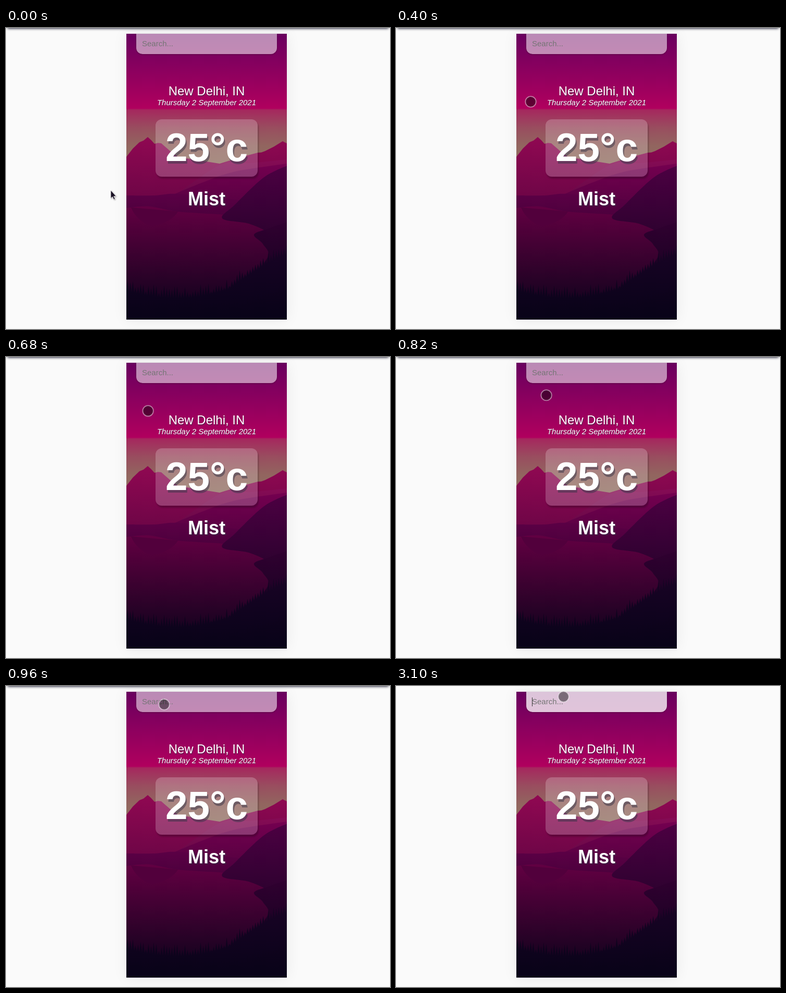
Write an HTML page that moves like this. It is 737 px wide and 577 px high and loops after 8000 ms.

```html
<!DOCTYPE html>
<html lang="en">
<head>
<meta charset="utf-8">
<title>Weather</title>
<style>
  html, body { margin: 0; width: 100%; height: 100%; overflow: hidden; background: #fafafa; }
  body { position: relative; font-family: "Liberation Sans", Arial, sans-serif; color: #fff; }
  body > * { position: absolute; }
  svg { left: 0; top: 0; }
  #strip { left: 4px; right: 4px; top: -6px; height: 6px; box-shadow: 0 0 5px 1px #1c1c30; }
  #card { left: 231px; top: 11px; width: 308px; height: 548px; box-shadow: 0 0 26px rgba(0,0,0,.07);
    background: linear-gradient(#69005f, #b0005e 143px, #a5285e 146px, #994d5f 180px, #92655f 215px, #8f6f60 250px); }
  #bar { left: 250px; top: 11px; width: 270px; height: 39px; border-radius: 0 0 12px 12px;
    background: rgba(255,255,255,.54); box-shadow: 0 1px 3px rgba(0,0,0,.3); }
  #bar.focus { background: rgba(255,255,255,.77); }
  #caret { left: 261px; top: 22px; width: 1px; height: 17px; background: #333; }
  #panel { left: 287px; top: 175px; width: 196px; height: 110px; border-radius: 12px;
    background: rgba(255,255,255,.21); box-shadow: 2px 4px 3px rgba(0,0,0,.22); }
  .text { left: 231px; width: 308px; text-align: center; line-height: 0; white-space: nowrap; }
  #search { left: 261px; top: 30px; width: auto; font-size: 15px; color: #757575; }
  #city { top: 120.5px; font-size: 24px; text-shadow: 1px 2px rgba(50,50,70,.5); }
  #date { top: 143px; font-size: 15px; font-style: italic; text-shadow: 1px 1px rgba(50,50,70,.5); }
  #temp { top: 229px; font-size: 76.5px; font-weight: 700; text-shadow: 2.25px 4.5px rgba(50,50,70,.5); }
  #sky { top: 327.5px; font-size: 36px; font-weight: 700; text-shadow: 2.25px 2.25px rgba(50,50,70,.5); }
</style>
</head>
<body>
<div id="strip"></div>
<div id="card"></div>
<svg width="737" height="577">
  <clipPath id="clip"><path d="M231 11h308v548h-308z"/></clipPath>
  <g id="land" clip-path="url(#clip)"></g>
  <path d="M240 344Q252 372 281 380 318 372 330 352z" fill="#52003c"/>
</svg>
<div id="bar"></div>
<div id="search" class="text">Search...</div>
<div id="caret"></div>
<div id="city" class="text">New Delhi, IN</div>
<div id="date" class="text">Thursday 2 September 2021</div>
<div id="panel"></div>
<div id="temp" class="text">25°c</div>
<div id="sky" class="text">Mist</div>
<svg width="737" height="577">
  <path id="arrow" d="M201 311v15.5l3.4-3 2.6 5.6 2.4-1.1-2.6-5.4h4.6z" fill="#170f22" stroke="#fff"
    stroke-width=".8" style="filter:drop-shadow(1px 1px 1px rgba(0,0,0,.35))"/>
  <circle id="dot" r="10.2" fill="rgba(0,0,0,.45)" stroke="rgba(255,255,255,.48)" stroke-width="1.8"/>
</svg>
<script>
const $ = id => document.getElementById(id);
const LOOP = 8000, LEFT = 231, RIGHT = 539, BOTTOM = 559, NIGHT = "#080318";
const touchAt = 400, restAt = 1100, focusAt = 3100;

let seed = 7;
const random = () => (seed = seed * 16807 % 2147483647) / 2147483647;

// Joins points with a smooth curve.
function smooth(points) {
  const at = i => points[Math.max(0, Math.min(points.length - 1, i))];
  const pull = (i, sign) => [0, 1].map(k => at(i)[k] + sign * (at(i + 1)[k] - at(i - 1)[k]) / 6);
  return points.slice(1).map((p, i) => `C${pull(i, 1)} ${pull(i + 1, -1)} ${p}`).join("");
}

// Joins points with short uneven steps, like rock.
function rough(points) {
  return points.slice(1).map(([x, y], i) => {
    const [px, py] = points[i], bump = (random() - .5) * 4;
    return `L${(px + x) / 2} ${(py + y) / 2 + bump}L${x} ${y}`;
  }).join("");
}

// Fills the ground under a line, fading down into the night colour.
function layer(points, join, top, bottom = NIGHT) {
  const id = "fade" + land.childElementCount, end = points[points.length - 1];
  land.innerHTML += `<g><linearGradient id="${id}" x2="0" y2="1"><stop stop-color="${top}"/>
    <stop offset="1" stop-color="${bottom}"/></linearGradient>
    <path fill="url(#${id})" d="M${points[0]}${join(points)}L${end[0]} ${BOTTOM}H${points[0][0]}z"/></g>`;
}

// Pointed trees standing on ground(x).
function forest(ground, height) {
  const points = [];
  for (let x = LEFT; x < RIGHT + 5; x += 5) {
    const y = ground(x);
    points.push([x, y], [x + 2.5, y - height * (.3 + random())]);
  }
  return points;
}
const straight = points => points.map(p => "L" + p).join("");

const land = $("land");
// Distant peaks and hills
layer([[231, 247], [256, 219], [272, 209], [285, 222], [298, 221], [330, 247], [410, 260], [483, 239],
  [497, 236], [531, 217], [539, 221]], rough, "#900852", "#2a0030");
layer([[320, 324], [412, 262], [470, 259], [539, 252]], smooth, "#850b55");
layer([[310, 324], [375, 297], [440, 275], [539, 260]], smooth, "#740050");
// Far shore and lake
layer([[231, 321], [285, 321], [330, 318], [430, 328], [539, 340]], smooth, "#5b0045");
layer([[231, 345], [275, 342], [330, 352], [420, 358], [539, 368]], smooth, "#620042");
// Right hill and near bank
layer([[539, 264], [494, 287], [440, 338], [415, 365], [466, 375], [505, 392]], smooth, "#4c0042");
layer([[539, 372], [505, 384], [476, 396], [493, 414], [502, 440], [455, 487], [380, 512]], smooth, "#300030");
// Trees
layer(forest(x => 504 + 14 * Math.sin((x - LEFT) / 62) - Math.max(0, x - 420) * .48, 19), straight, "#1a0326");
layer(forest(x => 535 - Math.max(0, x - 450) * .35, 14), straight, "#10031d");

// Even steps in time from touch to rest, after a slower first stretch.
const stops = [[258.5, 141.5], [265.5, 122.5], [272.5, 103.5], [288.5, 73.5], [303.5, 35.5], [311.5, 20.5]];

function dotAt(t) {
  if (t >= focusAt) return [321.5, 20.5];
  const pos = Math.min(1, (t - touchAt) / (restAt - touchAt)) * (stops.length - 1);
  const i = Math.min(Math.floor(pos), stops.length - 2);
  return stops[i].map((from, k) => from + (stops[i + 1][k] - from) * (pos - i));
}

const show = (id, on) => $(id).style.visibility = on ? "visible" : "hidden";
const move = (id, x, y) => $(id).setAttribute("transform", `translate(${x} ${y})`);

function draw(t) {
  const touching = t >= touchAt, focused = t >= focusAt;
  show("strip", !focused);
  show("arrow", !touching);
  show("dot", touching);
  show("caret", focused);
  $("bar").classList.toggle("focus", focused);
  if (touching) move("dot", ...dotAt(t));
  else if (t < 120) move("arrow", 0, 0);
  else move("arrow", 2, -1);
}

const start = performance.now();
function tick() {
  draw((performance.now() - start) % LOOP);
  requestAnimationFrame(tick);
}
tick();
</script>
</body>
</html>
```
